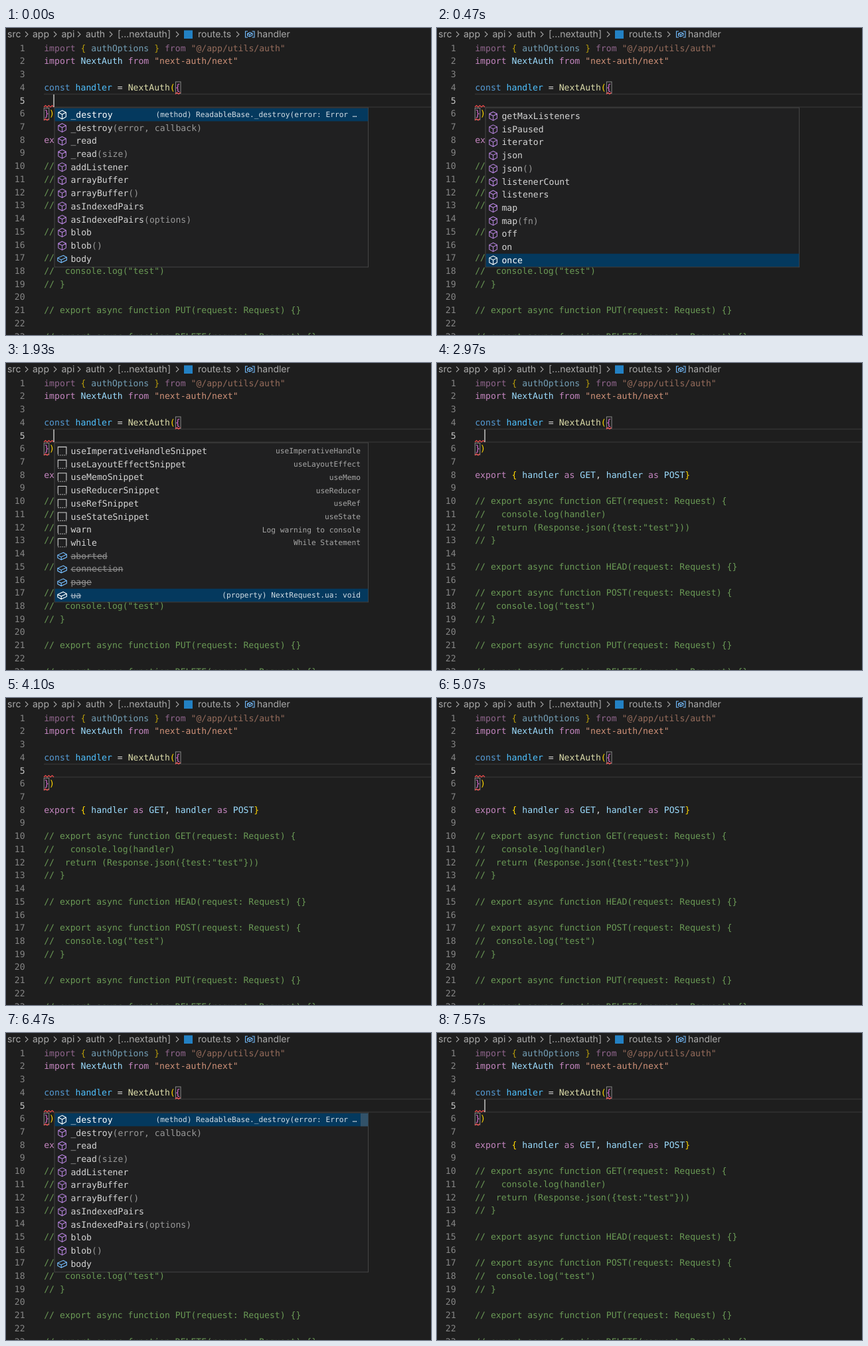
These frames come from a looping animation (640x462 px, 8000 ms). An HTML page:

```html
<!DOCTYPE html>
<html lang="en">
<head>
<meta charset="utf-8">
<title>Editor suggestions</title>
<style>
  html, body { margin: 0; width: 100%; height: 100%; overflow: hidden; background: #1e1e1e; }
  svg { display: block; width: 640px; height: 462px; }
  text { font: 13.14px "DejaVu Sans Mono", monospace; fill: #d4d4d4; white-space: pre; text-rendering: geometricPrecision; }
  .crumb { font: 14px Inter, sans-serif; fill: #a9a9a9; }
  .num { fill: #858585; text-anchor: end; }
  .num.active { fill: #c6c6c6; }
  .detail { font-size: 11.2px; fill: #a6a6a6; text-anchor: end; }
  .args { fill: #989898; }
  .old { fill: #8d8d8d; text-decoration: line-through; }
  .sel text { fill: #fff; }
  .sel .detail { fill: #d3dde4; }
  .sel .old { fill: #a5b6c4; }
  .icon, .chev, .wave { fill: none; stroke-width: 1.1; }
  .chev { stroke: #a0a0a0; }
  .wave { stroke: #f14c4c; }
  .method { stroke: #b180d7; }
  .field { stroke: #75beff; }
  .snip { stroke: #d0d0d0; }
  .sel .icon { stroke: #fff; }
</style>
</head>
<body>
<svg viewBox="0 0 640 462">
  <defs><clipPath id="view"><rect x="73.5" y="120.6" width="472" height="238.8"/></clipPath></defs>
  <g id="editor"></g>
  <rect id="caret" x="71.3" y="100" width="1.5" height="19" fill="#c4c4c2"/>
  <g id="popup">
    <rect x="73" y="120" width="472.5" height="239.8" fill="#202021" stroke="#454545"/>
    <g clip-path="url(#view)"><g id="list"></g></g>
    <rect id="thumb" x="534" y="121" width="11" height="19.5" fill="#797979" opacity=".4"/>
  </g>
</svg>
<script>
const $ = id => document.getElementById(id);
const LOOP = 8000, LINE = 19.72, LEFT = 57.2, CHAR = 7.91;
const TOP = 120.6, VIEW = 238.8;

const text = (x, y, body, cls = '') => `<text x="${x}" y="${y}" class="${cls}">${body}</text>`;
const baseline = n => 34.7 + (n - 1) * LINE;

// ---- editor ----
const colors = {
  k: '#c586c0', v: '#9cdcfe', c: '#4fc1ff', d: '#569cd6', f: '#dcdcaa',
  s: '#ce9178', b: '#ffd700', p: '#da70d6', w: '#d4d4d4', m: '#6a9955'
};
// each token is a colour key followed by its text
const code = {
  1: ['kimport ', 'b{ ', 'vauthOptions', 'b } ', 'kfrom ', 's"@/app/utils/auth"'],
  2: ['kimport ', 'vNextAuth ', 'kfrom ', 's"next-auth/next"'],
  4: ['dconst ', 'chandler ', 'w= ', 'fNextAuth', 'b(', 'p{'],
  6: ['p}', 'b)'],
  8: ['kexport ', 'b{ ', 'vhandler ', 'kas ', 'vGET', 'w, ', 'vhandler ', 'kas ', 'vPOST', 'b}'],
  10: ['m// export async function GET(request: Request) {'],
  11: ['m//   console.log(handler)'],
  12: ['m//  return (Response.json({test:"test"}))'],
  13: ['m// }'],
  15: ['m// export async function HEAD(request: Request) {}'],
  17: ['m// export async function POST(request: Request) {'],
  18: ['m//  console.log("test")'],
  19: ['m// }'],
  21: ['m// export async function PUT(request: Request) {}'],
  23: ['m// export async function DELETE(request: Request) {}']
};

function wave(x, y, width) {
  let d = `M${x} ${y + 2}`;
  for (let i = 1; i * 2.5 <= width; i++) d += `L${x + i * 2.5} ${y + (i % 2 ? -0.5 : 2)}`;
  return `<path class="wave" d="${d}"/>`;
}
const bracket = (x, y) =>
  `<rect x="${x}" y="${y}" width="7.6" height="17.4" fill="none" stroke="#888"/>`;

function icon(kind, x, y) {
  const shapes = {
    method: 'M0-6.4L5.8-3.4V3.4L0 6.6L-5.8 3.4V-3.4ZM-5.8-3.4L0-.3L5.8-3.4M0-.3V6.6',
    field: 'M1.6-5L6.8-2.2V2L-1.4 5.8L-6.8 2.8V-1.2ZM-6.8-1.2L-1.4 1.6L6.8-2.2M-1.4 1.6V5.8',
    snip: 'M-6.3 5V-6.2H6.3V5M-6.3 6.2h1.4m1.6 0h1.4m1.6 0h1.4m1.6 0h1.4m1.4 0h.8'
  };
  return `<path class="icon ${kind}" transform="translate(${x} ${y})" d="${shapes[kind]}"/>`;
}

function drawEditor() {
  const crumbs = [[2, 'src'], [40, 'app'], [83.5, 'api'], [120, 'auth'],
    [168, '[...nextauth]'], [289, 'route.ts'], [378, 'handler']];
  let out = crumbs.map(([x, s]) => text(x, 14, s, 'crumb')).join('');
  for (const x of [29, 72, 108, 156, 256, 347])
    out += `<path class="chev" d="M${x} 5.5l4 4l-4 4"/>`;
  out += '<rect x="268" y="3.5" width="13" height="12.5" fill="#2381c4"/>';
  out += '<path class="icon field" d="M364 5h-3.5v9h3.5M370.5 5h3.5v9h-3.5M363.5 8.5l4-2l3.5 1.5v3l-4 2l-3.5-1.5zl3.5 1.5l4-2m-4 2v3"/>';
  out += '<path d="M57 99.5H640M57 119H640" stroke="#323232" stroke-width="1.4"/>';
  for (let n = 1; n <= 23; n++) {
    out += text(28.6, baseline(n), n, n === 5 ? 'num active' : 'num');
    const line = (code[n] || [])
      .map(t => `<tspan fill="${colors[t[0]]}">${t.slice(1)}</tspan>`).join('');
    out += `<g opacity="${n === 1 ? 0.68 : 1}">${text(LEFT, baseline(n), line)}</g>`;
  }
  out += bracket(LEFT + 25 * CHAR + 0.5, 81) + bracket(LEFT, 120.6);
  out += wave(LEFT + 25 * CHAR, 97.5, 8) + wave(57, 117, 15) + wave(57, 137, 8);
  $('editor').innerHTML = out;
}

// ---- suggestions ----
const item = (kind, name, detail = '') => ({ kind, name, detail });
const methods = ('_destroy _destroy(error,~callback) _read _read(size) addListener arrayBuffer arrayBuffer() ' +
  'asIndexedPairs asIndexedPairs(options)  blob blob()').split(/\s+/);
const more = ('clone clone() compose compose(stream) destroy destroy(error) drop drop(limit) emit eventNames ' +
  'every every(fn) filter filter(fn) find find(fn) flatMap forEach formData formData() getMaxListeners ' +
  'isPaused iterator json json() listenerCount listeners map map(fn) off on once pause pipe push read ' +
  'reduce removeListener resume setEncoding some take text text() toArray unpipe unshift wrap').split(' ');
const hooks = 'ImperativeHandle LayoutEffect Memo Reducer Ref State'.split(' ');
const items = [
  ...methods.map(s => item('method', s)),
  item('field', 'body'), item('field', 'bodyUsed'), item('field', 'cache'),
  ...more.map(s => item('method', s)),
  ...hooks.map(s => item('snip', `use${s}Snippet`, 'use' + s)),
  item('snip', 'warn', 'Log warning to console'),
  item('snip', 'while', 'While Statement'),
  ...['aborted', 'connection', 'page', 'ua'].map(s => ({ ...item('field', s), old: true }))
];
const last = items.length - 1;
items[0].info = '(method) ReadableBase._destroy(error: Error …';
items[last].info = '(property) NextRequest.ua: void';

function row(it, i, selected, resolved) {
  const y = TOP + i * LINE;
  const [, name, args] = it.name.replace('~', ' ').match(/^(\w+)(.*)$/);
  const detail = selected && resolved && it.info || it.detail;
  return `<g class="${selected ? 'sel' : ''}">` +
    (selected ? `<rect x="73.5" y="${y}" width="472" height="${LINE}" fill="#04395e"/>` : '') +
    icon(it.kind, 84.6, y + 9.8) +
    text(97.4, y + 14.2, name + (args && `<tspan class="args">${args}</tspan>`), it.old ? 'old' : '') +
    (detail ? text(i ? 534 : 528.6, y + 13.6, detail, 'detail') : '') + '</g>';
}

let shown = '';
function drawList(focus, resolved) {
  const key = focus + ':' + resolved;
  if (key === shown) return;
  shown = key;
  const scroll = Math.max(0, (focus + 1) * LINE - VIEW);
  const first = Math.floor(scroll / LINE);
  $('list').innerHTML = items.slice(first, first + 14)
    .map((it, i) => row(it, first + i, first + i === focus, resolved)).join('');
  $('list').setAttribute('transform', `translate(0 ${-scroll})`);
}

// ---- timeline ----
const show = (id, on) => $(id).setAttribute('visibility', on ? 'visible' : 'hidden');
const blinks = [70, 570, 1070, 1570, 2100, 2600, 3100, 3600, 4100, 4570, 5070, 5570, 6070, 6570, 7070, 7570];

function draw(t) {
  show('caret', blinks.filter(b => b <= t).length % 2 === 0);
  const opened = t < 1970 || (t >= 5530 && t < 6530);
  $('popup').style.display = opened ? '' : 'none';
  show('thumb', t >= 6300);
  if (!opened) return;
  // holding the key: the focus runs down the list in steps of a key repeat
  const held = t < 1970 ? Math.floor((t - 230) / 33 + 1) / 13 : 0;
  const focus = Math.round(Math.min(1, Math.max(0, held)) * last);
  drawList(focus, focus === 0 || t >= 1400);
}

drawEditor();
function tick() {
  draw(performance.now() % LOOP);
  requestAnimationFrame(tick);
}
tick();
</script>
</body>
</html>
```
